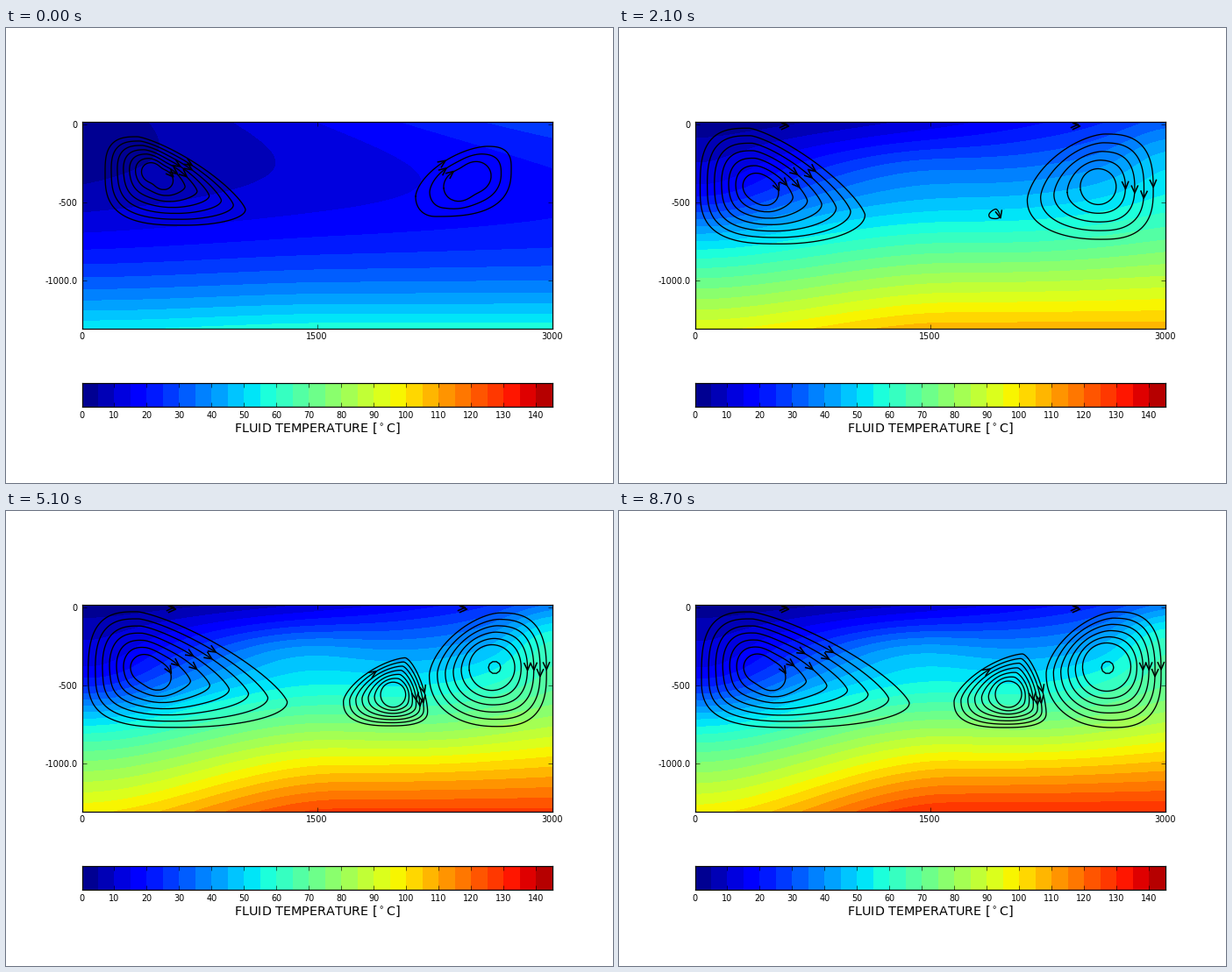
A matplotlib script for the animation above (9 s loop, 692 by 519 pixels).

```python
import numpy as np
import matplotlib.pyplot as plt
from matplotlib.animation import FuncAnimation
from matplotlib.collections import LineCollection

W, H, DPI = 692, 519, 86.5
LEFT, RIGHT, TOP, BOTTOM = 86.5, 622.5, 107, 342.6
FRAMES, INTERVAL = 30, 300

plt.rcParams.update({"font.family": "DejaVu Sans", "font.size": 8,
                     "axes.linewidth": 1.0})


def phase(frame):
    """0 to 1 while the cells form, then settling towards 2."""
    if frame <= 5:
        return frame / 5
    return 1 + (1 - np.exp(-(frame - 5) / 7)) / (1 - np.exp(-24 / 7))


def over(u, *values):
    """A value eased through the four stages of heating."""
    return np.interp(u, [0, 1, 1.45, 2], values)


def bump(s, d, s0, d0, ws, wd):
    return np.exp(-((s - s0) / ws)**2 - ((d - d0) / wd)**2)


def temperature(s, d, u):
    """s runs along the section and d down it, both from 0 to 1."""
    ramp = np.clip(s / 0.55, 0, 1)
    ramp = ramp * ramp * (3 - 2 * ramp)
    base = over(u, 54, 84, 101, 98) + over(u, 4, 12, 16, 32) * ramp
    surface = 1 + 28 * s**over(u, 1, 1.2, 1.5, 1.6)
    heat = (surface * (1 - d)**over(u, 2, 1.3, 1, 1)
            + base * d**over(u, 2.1, 1.15, 1, 1))
    sinking = -16 * bump(s, d, 0.02, 0.34, 0.18, 0.2)
    rising = (15 * bump(s, d, 1, 0.16, 0.1, 0.18)
              + 8 * bump(s, d, 0.45, 0.22, 0.17, 0.13)
              - 7 * bump(s, d, 0.75, 0.5, 0.22, 0.25))
    return heat + over(u, 0, 0.5, 1, 1) * sinking + over(u, 0, 0, 0.8, 1) * rising


class Cell:
    """Nested rings between a round core and an outline through four extremes.

    Each state holds the top, right, bottom and left points, the core centre
    and the core's radius with its stretch along the tilt.  The bends shape
    the quarters clockwise from the upper right: 1 is straight, 2 is round.
    """

    def __init__(self, bends, tilt, *states):
        self.bends, self.tilt = bends, np.radians(tilt)
        self.states = np.array(states, float)

    def rings(self, pos, n, size=1.0):
        i = int(np.clip(pos, 0, len(self.states) - 2))
        k = np.clip(pos - i, 0, 1)
        *ends, core, (r, stretch) = self.states[i] * (1 - k) + self.states[i + 1] * k
        q = np.linspace(0, np.pi / 2, 30)
        outer = []
        for j, bend in enumerate(self.bends):
            a, b = ends[j], ends[(j + 1) % 4]
            corner = np.array([b[0], a[1]] if j % 2 == 0 else [a[0], b[1]])
            centre = a + b - corner
            outer.append(centre + (a - centre) * np.cos(q)[:, None]**(2 / bend)
                         + (b - centre) * np.sin(q)[:, None]**(2 / bend))
        outer = np.vstack(outer) - core
        ang = np.arctan2(outer[:, 1], outer[:, 0])
        rad = r * (1 + stretch * np.cos(2 * (ang - self.tilt)))
        inner = rad[:, None] * np.column_stack([np.cos(ang), np.sin(ang)])
        return [core + size * (outer + (inner - outer) * j / max(n - 1, 1))
                for j in range(n)], core


WEST = Cell((1.3, 2, 3, 3), 33,
            [(150, 124), (273, 207), (205, 225), (113, 165), (172.5, 169), (15, .3)],
            [(148, 114), (263, 211), (180, 246), (92, 180), (160, 184), (18, .12)],
            [(150, 115), (331, 219), (200, 247), (94, 190), (166, 184), (21, .22)])
EAST = Cell((2.8, 2.7, 2.2, 1.6), -30,
            [(548, 135), (576, 160), (490, 215), (467, 192), (526, 175), (23, .25)],
            [(550, 123), (606, 185), (545, 239), (458, 200), (543, 182), (18, 0)],
            [(565, 115), (618, 185), (562, 247), (487, 185), (556, 178), (27.5, 0)])
MIDDLE = Cell((1.5, 2.6, 2.6, 1.5), 0,
              [(432, 188), (451, 219), (430, 236), (397, 217), (429, 212), (11, 0)],
              [(460, 163), (487, 230), (440, 247), (382, 217), (444, 209), (15, 0)])


def chevron(x, y, a):
    tip = np.array([x + 4.5 * np.cos(a), y + 4.5 * np.sin(a)])
    tails = [tip - 9.5 * np.array([np.cos(a + s), np.sin(a + s)])
             for s in (-0.42, 0.42)]
    return np.array([tails[0], tip, tails[1]])


def marks_on(rings, core, bearing, spread, seed):
    """One chevron per ring near a bearing, pointing along the flow."""
    noise = np.random.default_rng(seed).uniform(-spread, spread, 8)
    out = []
    for ring, jitter in zip(rings[::-1], noise):
        rel = ring - core
        off = np.arctan2(rel[:, 1], rel[:, 0]) - np.radians(bearing + jitter)
        i = np.argmax(np.cos(off))
        dx, dy = ring[(i + 3) % len(ring)] - ring[i - 3]
        out.append(chevron(*ring[i], np.arctan2(dy, dx)))
    return out


def flow(frame):
    u = phase(frame)
    west, core = WEST.rings(u, 7)
    marks = marks_on(west[1:], core, -18, 12, 4)

    east, core = EAST.rings(u, int(round(np.interp(u, [1, 1.4], [3, 6]))))
    if u < 1.2:
        marks += marks_on(east, core, 210, 8, 2)
    else:
        marks += marks_on(east[:4], core, 3, 7, 2)
    lines = west + east

    grown = np.clip((u - 1.2) / 0.25, 0, 1)
    if grown > 0:
        pos = np.clip((u - 1.45) / 0.55, 0, 1)**0.6
        n = int(round(grown * np.interp(pos, [0, 0.6], [4, 7])))
        middle, core = MIDDLE.rings(pos, n, grown)
        marks += marks_on(middle[:4], core, 0, 18, 7)
        marks += marks_on(middle[1:2], core, 225, 5, 1)
        lines += middle
    if u > 1.6:
        a = np.linspace(0, 2 * np.pi, 11)
        lines.append(np.column_stack([557 + 7 * np.cos(a), 178.5 + 7 * np.sin(a)]))

    # Surface inlets
    for x, start in ((188, 0.6), (520, 1.2)):
        if u >= start:
            marks += [chevron(x + dx, 111 + dx, 0) for dx in (-1, 1)]
    return lines, marks


def box(x0, y0, x1, y1):
    return fig.add_axes([x0 / W, 1 - y1 / H, (x1 - x0) / W, (y1 - y0) / H])


fig = plt.figure(figsize=(W / DPI, H / DPI), dpi=DPI, facecolor="white")
TICKS = dict(direction="in", length=4, width=0.5, pad=4, top=True, zorder=5)

ax = box(LEFT, TOP, RIGHT, BOTTOM)
ax.set(xlim=(LEFT, RIGHT), ylim=(BOTTOM, TOP))
ax.set_xticks([LEFT, (LEFT + RIGHT) / 2, RIGHT], ["0", "1500", "3000"])
ax.set_yticks([109.7, 199.1, 288.5], ["0", "-500", "-1000.0"])
ax.tick_params(right=True, **TICKS)

bar = box(LEFT, 404.7, RIGHT, 431.8)
levels = np.arange(0, 150, 5)
bar.pcolormesh(levels, [0, 1], (levels[:-1] + 2.5)[None, :], cmap="jet",
               vmin=0, vmax=150)
bar.set(xlim=(0, 145), ylim=(0, 1), yticks=[])
bar.set_xticks(range(0, 145, 10))
bar.tick_params(**TICKS)
fig.text(354.5 / W, 1 - 461 / H, r"FLUID TEMPERATURE [$^\circ$C]", fontsize=12,
         ha="center", va="baseline")

xs, ys = np.linspace(LEFT, RIGHT, 180), np.linspace(TOP, BOTTOM, 90)
along, depth = np.meshgrid(np.linspace(0, 1, 180), np.linspace(0, 1, 90))

stream = LineCollection([], colors="black", linewidths=1.1, zorder=3)
arrows = LineCollection([], colors="black", linewidths=1.3, zorder=4)
ax.add_collection(stream, autolim=False)
ax.add_collection(arrows, autolim=False)
shown = []


def draw(frame):
    while shown:
        shown.pop().remove()
    heat = np.clip(temperature(along, depth, phase(frame)), 0.1, 144.9)
    shown.append(ax.contourf(xs, ys, heat, levels, cmap="jet", vmin=0, vmax=150,
                             zorder=1))
    ax.set(xlim=(LEFT, RIGHT), ylim=(BOTTOM, TOP))
    lines, marks = flow(frame)
    stream.set_segments(lines)
    arrows.set_segments(marks)
    return stream, arrows


anim = FuncAnimation(fig, draw, frames=FRAMES, interval=INTERVAL, repeat=True,
                     repeat_delay=0, blit=False)
plt.show()
```
